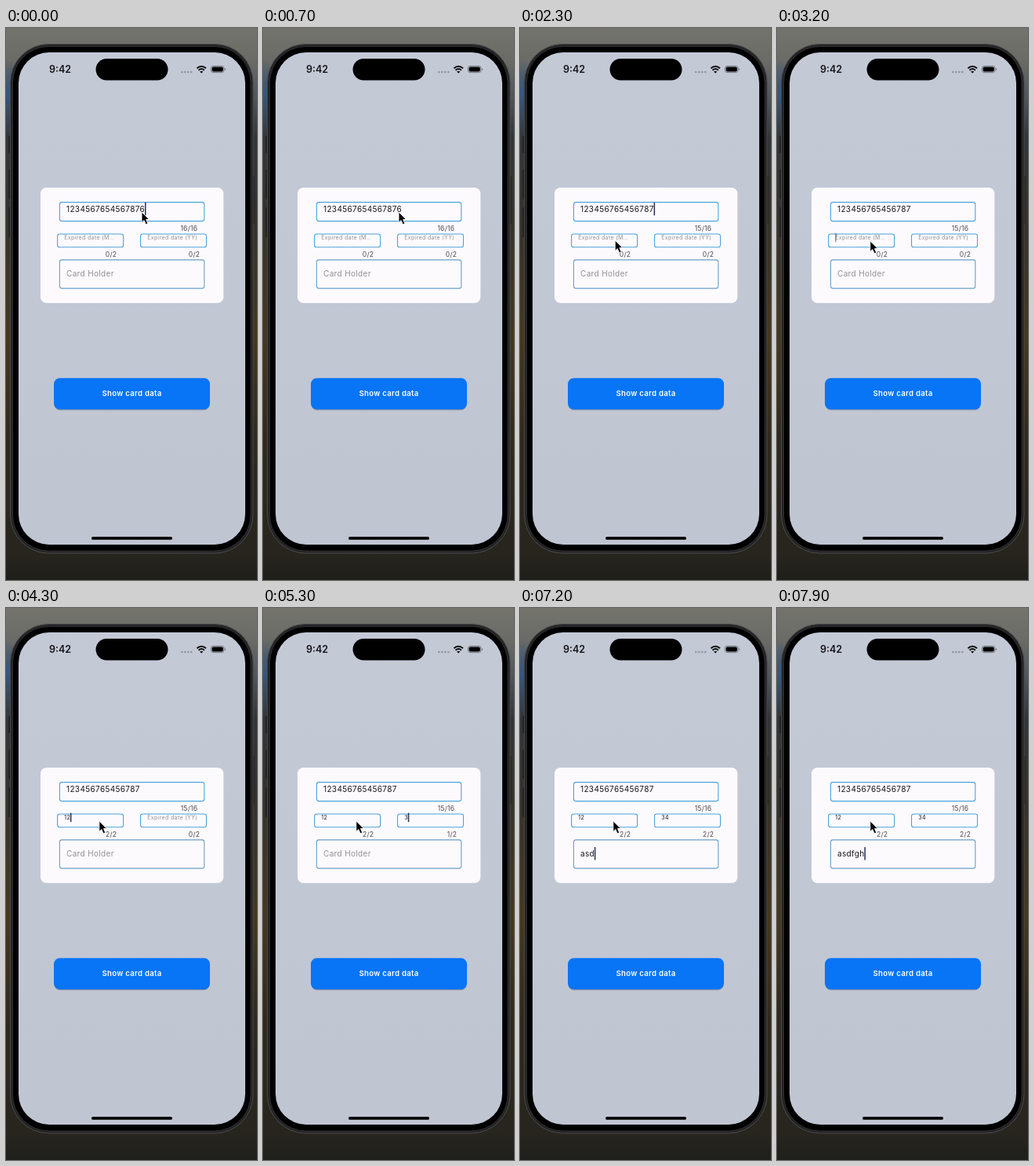
Recreate the animation shown at these times as an HTML page. Size 320 by 702 pixels, loop 8000 ms.

```html
<!DOCTYPE html>
<html lang="en">
<head>
<meta charset="utf-8">
<title>Card form</title>
<style>
  html, body { margin: 0; width: 100%; height: 100%; overflow: hidden; background: #26251f; }
  svg { display: block; width: 320px; height: 702px; }
  text { font-family: Inter, "Liberation Sans", sans-serif; fill: #161518; white-space: pre; }
  .big { font-size: 10px; letter-spacing: .35px; }
  .small { font-size: 7px; letter-spacing: .35px; }
  .count { font-size: 8.5px; letter-spacing: .25px; fill: #4b4950; text-anchor: end; }
  text.hint { fill: #918f94; }
  .field { fill: none; stroke: #4ba3dc; stroke-width: 1.1; }
</style>
</head>
<body>
<svg viewBox="0 0 320 702">
  <defs>
    <linearGradient id="back" x2="0" y2="1">
      <stop offset="0" stop-color="#74746d"/>
      <stop offset=".06" stop-color="#6a6b66"/>
      <stop offset=".13" stop-color="#4d535a"/>
      <stop offset=".2" stop-color="#333538"/>
      <stop offset=".35" stop-color="#35322a"/>
      <stop offset=".56" stop-color="#46381c"/>
      <stop offset=".75" stop-color="#30291b"/>
      <stop offset=".95" stop-color="#27251e"/>
      <stop offset="1" stop-color="#1f1f1b"/>
    </linearGradient>
    <linearGradient id="left" x2="0" y2="1">
      <stop offset="0" stop-color="#345780" stop-opacity="0"/>
      <stop offset=".4" stop-color="#345780"/>
      <stop offset="1" stop-color="#263547" stop-opacity="0"/>
    </linearGradient>
    <linearGradient id="screen" x2="0" y2="1">
      <stop offset="0" stop-color="#c4c9d6"/>
      <stop offset="1" stop-color="#c0c5d2"/>
    </linearGradient>
  </defs>

  <rect width="320" height="702" fill="url(#back)"/>
  <rect y="40" width="8" height="110" fill="url(#left)"/>

  <g fill="#1b1b1c">
    <rect x="3.6" y="137" width="3" height="22" rx="1"/>
    <rect x="3.6" y="180" width="3" height="38" rx="1"/>
    <rect x="3.6" y="228" width="3" height="38" rx="1"/>
    <rect x="313.4" y="188" width="3" height="62" rx="1"/>
  </g>
  <rect x="5.5" y="20.5" width="309.5" height="647.5" rx="49" fill="#232325" stroke="#4b4b4d"/>
  <rect x="8.5" y="23.5" width="303.5" height="641.5" rx="46" fill="#000" stroke="#39393b" stroke-width=".8"/>
  <rect x="16" y="31" width="289" height="626" rx="39" fill="url(#screen)"/>
  <rect x="114.5" y="39" width="92" height="27.5" rx="13.75"/>
  <rect x="109" y="647" width="103" height="3.8" rx="1.9"/>

  <text x="55" y="57" font-size="12.5" font-weight="600">9:42</text>
  <g fill="#8f949f">
    <circle cx="224.3" cy="56" r="1.3"/><circle cx="228.3" cy="56" r="1.3"/>
    <circle cx="232.3" cy="56" r="1.3"/><circle cx="236.3" cy="56" r="1.3"/>
  </g>
  <g fill="none" stroke="#0b0b0c" stroke-width="1.9">
    <path d="M243.4 51.3Q249.2 46.2 255 51.3"/>
    <path d="M245.5 53.7Q249.2 50.5 252.9 53.7"/>
  </g>
  <path d="M247.2 55.5Q249.2 54 251.2 55.5L249.2 57.6Z"/>
  <rect x="261.4" y="48.4" width="16.6" height="8.2" rx="2.6" fill="none" stroke="#6d717a" stroke-width=".9"/>
  <rect x="262.6" y="49.6" width="14.2" height="5.8" rx="1.6"/>
  <path d="M279 51.2q1.3 .3 1.3 1.3t-1.3 1.3z" fill="#6d717a"/>

  <rect x="44" y="203" width="233.3" height="146.7" rx="7.5" fill="#fdfafd"/>
  <rect class="field" x="68.4" y="221.6" width="184.4" height="24" rx="2.8"/>
  <rect class="field" x="65.6" y="262" width="84" height="16.8" rx="2.8"/>
  <rect class="field" x="171.5" y="262" width="84" height="16.8" rx="2.8"/>
  <rect class="field" x="68.4" y="294.9" width="184.4" height="36.2" rx="2.8"  style="stroke:#6a9fc6"/>

  <text id="number" class="big" x="77" y="233.7"></text>
  <text id="month" class="small" x="74.3" y="269"></text>
  <text id="year" class="small" x="180.3" y="269"></text>
  <text id="holder" class="big" x="77" y="316"></text>
  <text id="numberCount" class="count" x="244.2" y="257.8"></text>
  <text id="monthCount" class="count" x="141.2" y="290.9"></text>
  <text id="yearCount" class="count" x="247.2" y="290.9"></text>
  <rect id="caret" width="1.5" rx=".6" fill="#26305a"/>

  <rect x="61.5" y="446.6" width="198" height="39.6" rx="7.5" fill="#7f8797" opacity=".75"/>
  <rect x="61" y="445.2" width="199" height="39.8" rx="7.5" fill="#0874f6"/>
  <text x="160.6" y="468.4" text-anchor="middle" font-size="9.6" font-weight="600"
        letter-spacing=".3" style="fill:#fff">Show card data</text>

  <path id="mouse" d="M0 0V13.4L3 10.6L5.3 15.8L7.9 14.7L5.7 9.6H9.7Z"
        stroke="#fff" stroke-width=".9" stroke-linejoin="round"/>
</svg>
<script>
const LOOP = 8000, TICK = 100;
const $ = id => document.getElementById(id);

const fields = {
  number: { hint: "", max: 16, top: 221.8, height: 16.6 },
  month: { hint: "Expired date (M…", max: 2, top: 260.4, height: 11.8 },
  year: { hint: "Expired date (YY)", max: 2, top: 260.4, height: 11.8 },
  holder: { hint: "Card Holder", top: 304, height: 16.6 }
};

// [time, focused field, its value]; each step restarts the caret blink
const steps = [
  [-100, "number", "1234567654567876"],
  [1000, "number", "123456765456787"],
  [2700, "month", ""],
  [3700, "month", "1"],
  [4000, "month", "12"],
  [4600, "year", ""],
  [5200, "year", "3"],
  [5500, "year", "34"],
  [6100, "holder", ""],
  [6900, "holder", "a"],
  [7000, "holder", "as"],
  [7200, "holder", "asd"],
  [7300, "holder", "asdf"],
  [7500, "holder", "asdfg"],
  [7700, "holder", "asdfgh"]
];

// [time, x, y] of the pointer tip
const path = [[0, 173, 234], [1800, 173, 234], [2300, 121.2, 270], [2600, 118.8, 271], [LOOP, 118.8, 271]];

const clamp = v => Math.min(1, Math.max(0, v));
const ease = p => p * p * (3 - 2 * p);

function pointer(t) {
  const i = path.findIndex(p => p[0] > t);
  const [t0, x0, y0] = path[i - 1], [t1, x1, y1] = path[i];
  const p = ease((t - t0) / (t1 - t0));
  return [x0 + (x1 - x0) * p, y0 + (y1 - y0) * p];
}

function blink(age) {
  const p = age % 1000;
  return p < 900 ? clamp((600 - p) / 200) : (p - 900) / 100;
}

function draw(t) {
  const values = { number: "", month: "", year: "", holder: "" };
  let start, focus;
  for (const [at, id, value] of steps) {
    if (at > t) break;
    start = at;
    focus = id;
    values[id] = value;
  }
  for (const id in fields) {
    const { hint, max } = fields[id], value = values[id], el = $(id);
    el.textContent = value || hint;
    el.classList.toggle("hint", !value);
    if (max) $(id + "Count").textContent = `${value.length}/${max}`;
  }
  const el = $(focus), { top, height } = fields[focus], caret = $("caret");
  const width = values[focus] ? el.getComputedTextLength() : 0;
  caret.setAttribute("x", +el.getAttribute("x") + width - .2);
  caret.setAttribute("y", top);
  caret.setAttribute("height", height);
  caret.setAttribute("opacity", blink(t - start));
  $("mouse").setAttribute("transform", `translate(${pointer(t)})`);
}

const begin = performance.now();
function frame() {
  const t = (performance.now() - begin) % LOOP;
  draw(Math.floor(t / TICK) * TICK);
  requestAnimationFrame(frame);
}
frame();
</script>
</body>
</html>
```
